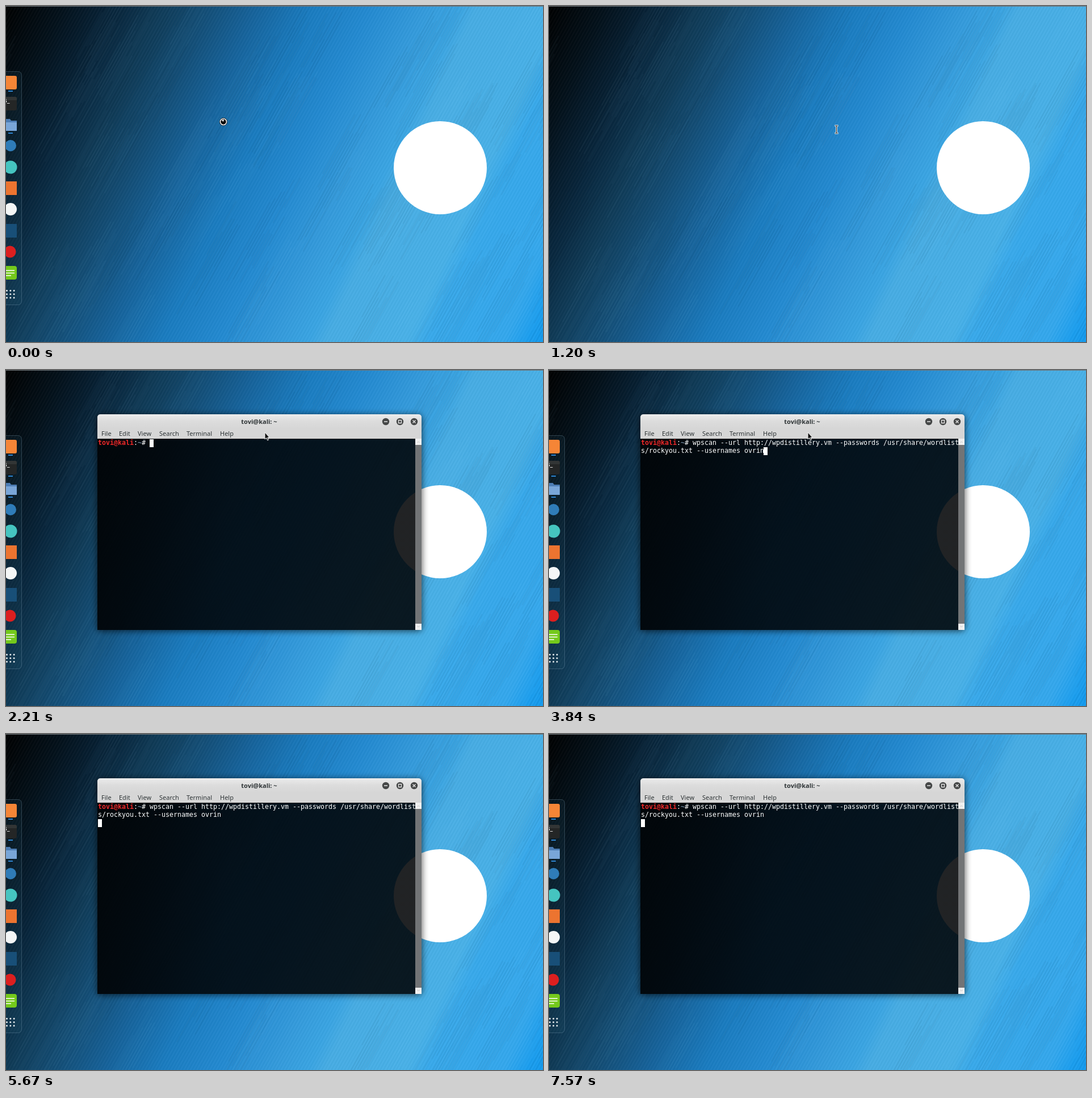
An HTML page for the animation above (8000 ms loop, 946 by 592 pixels).

```html
<!DOCTYPE html>
<html lang="en">
<head>
<meta charset="utf-8">
<title>Terminal session</title>
<style>
html, body { margin: 0; width: 100%; height: 100%; overflow: hidden; background: #000; }
svg { display: block; width: 946px; height: 592px; }
.ui { font: 11px "Noto Sans", "Open Sans", sans-serif; fill: #2e3436; }
.title { font-weight: 700; text-anchor: middle; }
.mono { font: 11.63px "DejaVu Sans Mono", "Liberation Mono", monospace; fill: #fff; white-space: pre; }
.user { font-weight: 700; fill: #ef2929; }
.path { fill: #8fa9c4; }
</style>
</head>
<body>
<svg viewBox="0 0 946 592" xmlns="http://www.w3.org/2000/svg">
  <defs>
    <linearGradient id="sky" gradientUnits="userSpaceOnUse" x1="0" y1="0" x2="1006" y2="453"></linearGradient>
    <pattern id="hatch" width="5" height="5" patternUnits="userSpaceOnUse" patternTransform="rotate(29)">
      <path d="M1 0V5" stroke="#fff" stroke-opacity=".03" stroke-width="1.6"/>
      <path d="M3.5 0V5" stroke="#001020" stroke-opacity=".035" stroke-width="1.6"/>
    </pattern>
    <linearGradient id="bar" x2="0" y2="1">
      <stop stop-color="#ececec"/><stop offset=".5" stop-color="#dcdcdc"/><stop offset="1" stop-color="#d6d6d6"/>
    </linearGradient>
    <linearGradient id="glass">
      <stop stop-color="#000204" stop-opacity=".92"/><stop offset=".4" stop-color="#000204" stop-opacity=".87"/>
      <stop offset="1" stop-color="#000204" stop-opacity=".87"/>
    </linearGradient>
    <filter id="blur" x="-10%" y="-10%" width="120%" height="120%"><feGaussianBlur stdDeviation="6"/></filter>
    <clipPath id="outside"><path clip-rule="evenodd" d="M0 0H946V592H0ZM161 458V84Q161 78 167 78H726Q732 78 732 84V458Z"/></clipPath>
  </defs>

  <rect width="946" height="592" fill="url(#sky)"/>
  <path id="dark" fill="none" stroke="#000c18" stroke-opacity=".035" stroke-width="2.4"/>
  <path id="light" fill="none" stroke="#8fd0f5" stroke-opacity=".03" stroke-width="2.4"/>
  <rect width="946" height="592" fill="url(#hatch)"/>
  <circle cx="765" cy="285" r="82" fill="#fff"/>

  <g id="dock">
    <rect x="-20" y="115.5" width="47.5" height="411" rx="6" fill="#2a5a70" fill-opacity=".14" stroke="#8fb0c4" stroke-opacity=".3"/>
    <rect x="-5" y="123" width="24" height="24" rx="3" fill="#f58536"/>
    <rect x="-5" y="160" width="24" height="24" rx="3" fill="#242626"/>
    <path d="M-5 162Q-5 160 -2 160H16Q19 160 19 163V166H-5Z" fill="#323535"/>
    <text x="-3" y="170" class="mono" style="font-size:8px;font-weight:700">$_</text>
    <path d="M-5 199H7L9 202H19V220H-5Z" fill="#4d7db4"/>
    <path d="M-5 205H19V220H-5Z" fill="#79a6d8"/>
    <circle cx="8" cy="246" r="10" fill="#2f7cb8"/>
    <circle cx="8" cy="284" r="11.5" fill="#45c4c0"/>
    <rect x="-5" y="309" width="24" height="24" fill="#ec7430"/>
    <circle cx="8" cy="358" r="11" fill="#f4f6f6"/>
    <rect x="-5" y="384" width="24" height="24" fill="#184f78"/>
    <circle cx="7" cy="433" r="10.5" fill="#dc1f1f"/>
    <rect x="-5" y="458" width="24" height="24" rx="4" fill="#74c91c"/>
    <path d="M0 466H15M0 470.500H15M0 475H9" stroke="#fff" stroke-width="1.6"/>
    <g id="dots" fill="#e4eaed"></g>
    <path d="M4 150H12M4 224H12" stroke="#2d84d0" stroke-width="2"/>
    <path id="running" d="M4 187H12" stroke="#2d84d0" stroke-width="2"/>
  </g>

  <g id="window">
    <g clip-path="url(#outside)">
      <rect x="160" y="79" width="573" height="381" rx="7" fill="#000" fill-opacity=".62" filter="url(#blur)"/>
    </g>
    <path d="M161 122V84Q161 78 167 78H726Q732 78 732 84V122Z" fill="#d6d6d6"/>
    <path d="M161 103V84Q161 78 167 78H726Q732 78 732 84V103Z" fill="url(#bar)"/>
    <text x="446" y="95" class="ui title">tovi@kali: ~</text>
    <g id="menu" class="ui"></g>
    <g fill="#464848"><circle cx="669" cy="91" r="6.200"/><circle cx="694" cy="91" r="6.200"/><circle cx="719" cy="91" r="6.200"/></g>
    <path d="M666 91H672M691.500 88.500H696.500V93.500H691.500ZM716.500 88.500L721.500 93.500M721.500 88.500L716.500 93.500" fill="none" stroke="#e6e6e6" stroke-width="1.300"/>
    <rect x="161" y="121" width="560" height="337" fill="url(#glass)"/>
    <rect x="721" y="121" width="11" height="337" fill="#727476"/>
    <path d="M721 121H732V132H721ZM721 447H732V458H721Z" fill="#f0f0f0"/>
    <path d="M724.500 128L726.500 126L728.500 128M724.500 451L726.500 453L728.500 451" fill="none" stroke="#c4c4c4"/>
    <text x="162" y="132" class="mono"><tspan class="user">tovi@kali</tspan>:<tspan class="path">~</tspan># <tspan id="line1"></tspan></text>
    <text id="line2" x="162" y="146" class="mono"></text>
    <path id="link" d="M343 134.500H497" stroke="#fff"/>
    <rect id="caret" width="7" height="14"/>
  </g>

  <g id="busy">
    <circle r="7" fill="#1c1c1c"/><circle r="5.500" fill="#0a0a0a" stroke="#f2f2f2" stroke-width="1.600"/>
    <path id="wedge" d="M0 0L-3.200 -2.500A4 4 0 0 1 1 -3.900Z" fill="#f2f2f2"/>
  </g>
  <path id="arrow" d="M0 0V12L2.700 9.600L4.600 14L6.500 13.200L4.700 9H8.200Z" fill="#111" stroke="#fff" stroke-width=".9"/>
  <g id="beam" fill="none">
    <path d="M-3 -6.500H3M-3 6.500H3M0 -6.500V6.500" stroke="#fff" stroke-width="3"/>
    <path d="M-2.500 -6.500H2.500M-2.500 6.500H2.500M0 -6.500V6.500" stroke="#222" stroke-width="1.200"/>
  </g>
  <path id="hand" d="M-2 -6Q-.5 -7 0 -5V-2L5 -.5Q6.500 0 6 2L4.500 5.500H-2L-6 1Q-6 -1 -4 0L-2 1Z" fill="#111" stroke="#fff" stroke-width=".9"/>
  <path d="M0 .5H946" stroke="#6d7478"/>
</svg>
<script>
const LOOP = 8000;
const $ = id => document.getElementById(id);

// Wallpaper: diagonal gradient with faint seeded streaks
$("sky").innerHTML = [
  [0, "#000"], [100, "#03101a"], [200, "#08263d"], [270, "#0f3a56"], [350, "#134c74"],
  [440, "#16629a"], [540, "#1a7bbf"], [640, "#2389d0"], [740, "#349adb"], [800, "#3aa4e2"],
  [830, "#47ace3"], [975, "#48b0e7"], [1010, "#37a8ea"], [1140, "#34a7ec"], [1185, "#1a9dee"],
  [1210, "#149aee"]
].map(([u, c]) => `<stop offset="${u / 1210}" stop-color="${c}"/>`).join("");

let seed = 7;
const rnd = () => (seed = (seed * 16807) % 2147483647) / 2147483647;
function streaks(id, clusters) {
  let d = "";
  for (let i = 0; i < clusters; i++) {
    const x = rnd() * 1150, y = rnd() * 560 - 60;
    for (let k = 0; k < 7; k++) {
      const h = 40 + rnd() * 110, top = y + rnd() * 60;
      d += `M${(x + k * 5 - (top - y) * .55).toFixed(1)} ${top.toFixed(1)}l${(-h * .55).toFixed(1)} ${h.toFixed(1)}`;
    }
  }
  $(id).setAttribute("d", d);
}
streaks("dark", 70);
streaks("light", 60);

$("dots").innerHTML = [...Array(9).keys()].map(i =>
  `<circle cx="${1.5 + i % 3 * 6.300}" cy="${501.500 + Math.floor(i / 3) * 6.200}" r="1.500"/>`).join("");
$("menu").innerHTML = Object.entries({ File: 168, Edit: 199, View: 232, Search: 270, Terminal: 318, Help: 377 })
  .map(([name, x]) => `<text x="${x}" y="116">${name}</text>`).join("");

// Held states: each entry lasts until the next one starts
const pointer = [
  [0, "busy", 383, 204, 0], [150, "busy", 383, 204, 60], [270, "busy", 383, 204, 120],
  [420, "busy", 383, 204, 180], [540, "busy", 383, 204, 240], [690, "busy", 383, 204, 300],
  [810, "arrow", 383, 203], [960, "arrow", 416, 206], [1080, "arrow", 470, 210],
  [1200, "beam", 506.500, 217.500], [1360, "beam", 508.500, 227], [1640, "beam", 506, 221.500],
  [1790, "beam", 476, 150], [1910, "arrow", 456, 110], [3990, "beam", 457, 129],
  [4140, "hand", 458, 132], [4300, "beam", 457, 149.500], [4440, "beam", 457, 157],
  [4560, "beam", 457, 160], [5520, "none"]
];
const caret = [
  [0, 0], [1360, 1, 253, 122, "#e4e4e4"], [1640, 0], [2210, 1, 253, 122], [3840, 1, 378, 136],
  [3990, 0], [4560, 1, 378, 136], [5120, 0], [5670, 1, 162, 150], [7270, 0], [7570, 1, 162, 150]
];
const dockShift = [[0, 0], [960, -6], [1080, -20], [1200, -40], [1360, 0]];
const at = (list, t) => list.filter(e => e[0] <= t).pop();
const show = (id, on) => $(id).setAttribute("visibility", on ? "inherit" : "hidden");

function draw(t) {
  show("window", t >= 1360);
  show("running", t >= 1360);
  $("dock").setAttribute("transform", `translate(${at(dockShift, t)[1]})`);

  const typed = t >= 3840;
  $("line1").textContent = typed ? "wpscan --url http://wpdistillery.vm --passwords /usr/share/wordlist" : "";
  $("line2").textContent = typed ? "s/rockyou.txt --usernames ovrin" : "";
  show("link", t >= 4140 && t < 4440);

  const [, on, cx = 0, cy = 0, fill = "#fff"] = at(caret, t);
  show("caret", on);
  $("caret").setAttribute("x", cx);
  $("caret").setAttribute("y", cy);
  $("caret").setAttribute("fill", fill);

  const [, kind, x = 0, y = 0, turn = 0] = at(pointer, t);
  for (const id of ["busy", "arrow", "beam", "hand"]) {
    show(id, id === kind);
    $(id).setAttribute("transform", `translate(${x} ${y})`);
  }
  $("wedge").setAttribute("transform", `rotate(${turn})`);
}

const start = performance.now();
function tick() {
  draw((performance.now() - start) % LOOP);
  requestAnimationFrame(tick);
}
tick();
</script>
</body>
</html>
```
